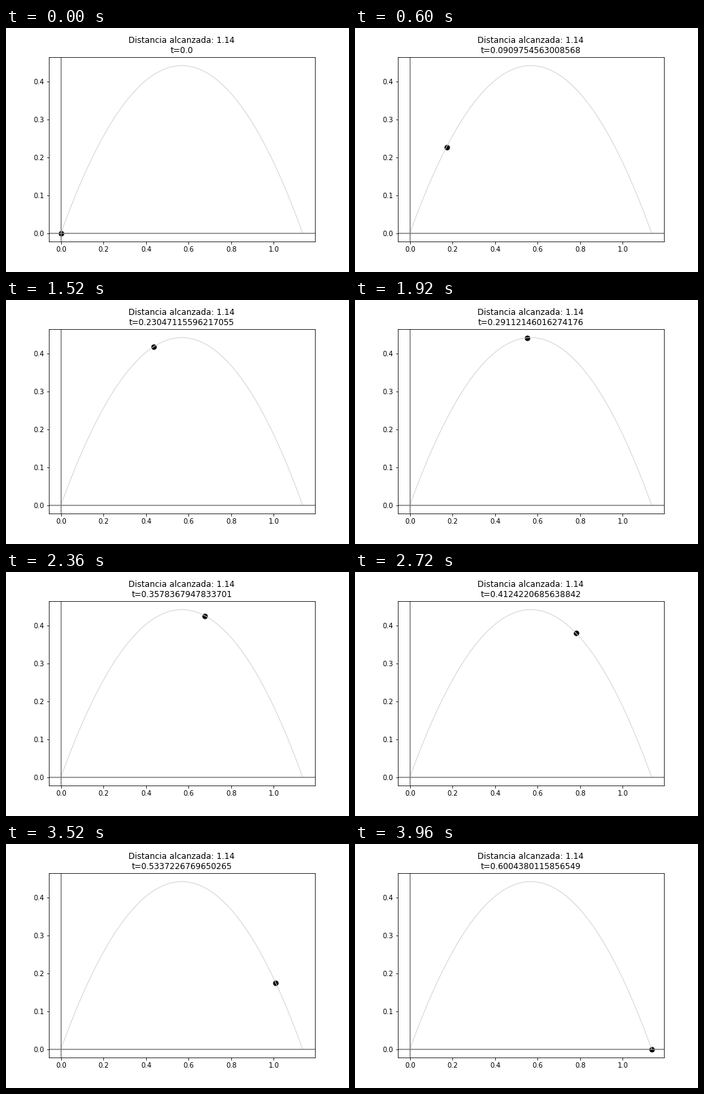
These frames come from a looping animation (504x360 px, 4000 ms). A matplotlib script:

```python
import math

import numpy as np
import matplotlib.pyplot as plt
from matplotlib.animation import FuncAnimation

FRAMES, INTERVAL = 100, 40
G, SPEED, ANGLE = 9.81, 3.5, 1.0
FLIGHT = 0.6004380115856549  # 2 * SPEED * sin(ANGLE) / G


def position(t):
    x = SPEED * math.cos(ANGLE) * t
    y = SPEED * math.sin(ANGLE) * t - G * t ** 2 / 2
    return x, y


times = np.linspace(0, FLIGHT, FRAMES)
reach = position(FLIGHT)[0]

fig, ax = plt.subplots(figsize=(7, 5), dpi=72)
fig.subplots_adjust(left=0.125, right=0.9, bottom=0.125, top=0.88)

ax.plot(*position(times), color="lightgray", linewidth=1)
ax.set_xlim(ax.get_xlim())
ax.set_ylim(ax.get_ylim())
ax.axhline(0, color="gray")
ax.axvline(0, color="gray")
ball = ax.scatter([0], [0], s=50, color="black")
title = ax.set_title("")


def update(i):
    t = float(times[i])
    ball.set_offsets([position(t)])
    title.set_text(f"Distancia alcanzada: {reach:.2f}\nt={t}")
    return ball, title


anim = FuncAnimation(fig, update, frames=FRAMES, interval=INTERVAL,
                     repeat=True, repeat_delay=0, blit=False)
plt.show()
```
